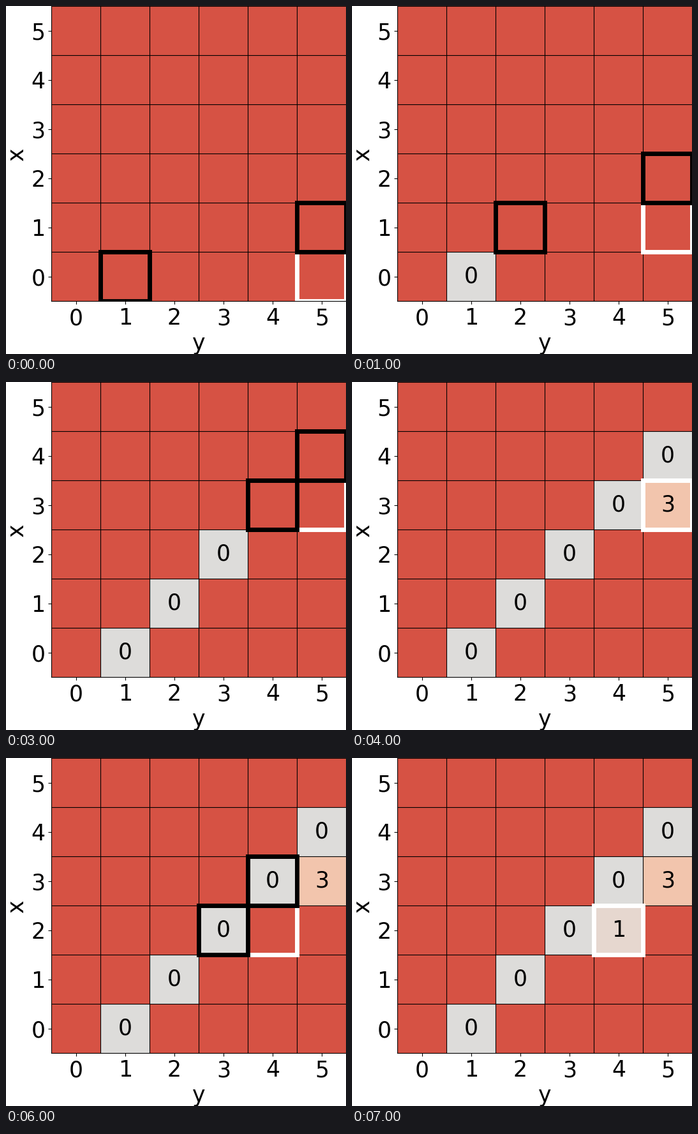
Write a matplotlib script that moves like this. It is 533 by 545 pixels and loops after 8 s.

```python
import matplotlib.pyplot as plt
from matplotlib.animation import FuncAnimation
from matplotlib.patches import Rectangle

W, H, DPI = 533, 545, 100
N, CELL = 6, 77
LEFT, BOTTOM = 71.4, 82.6
SIZE = 25
EMPTY = "#d65244"
SHADES = {0: "#dddcda", 1: "#e6d7cf", 3: "#f2c5ad"}

# (column, row): (value, step at which it is filled in)
FILLED = {
    (1, 0): (0, 1), (2, 1): (0, 2), (3, 2): (0, 3), (4, 3): (0, 4),
    (5, 4): (0, 4), (5, 3): (3, 4), (4, 2): (1, 7),
}

# Each step: the cell being solved and the two cells it depends on
STEPS = [((5, r), [(r + 1, r), (5, r + 1)]) for r in range(4)] + [
    ((5, 3), []),
    ((5, 2), [(4, 2), (5, 4)]),
    ((4, 2), [(3, 2), (4, 3)]),
    ((4, 2), []),
]

plt.rcParams["font.family"] = "DejaVu Sans"
fig = plt.figure(figsize=(W / DPI, H / DPI), dpi=DPI, facecolor="white")
ax = fig.add_axes([LEFT / W, BOTTOM / H, N * CELL / W, N * CELL / H])
ax.set(xlim=(-0.5, N - 0.5), ylim=(-0.5, N - 0.5), facecolor=EMPTY,
       xticks=range(N), yticks=range(N))
ax.tick_params(labelsize=SIZE)
ax.set_xlabel("y", fontsize=SIZE)
ax.set_ylabel("x", fontsize=SIZE)


def square(color=None, edge=None, z=1.0):
    patch = Rectangle((0, 0), 1, 1, facecolor=color or "none",
                      edgecolor=edge or "none", linewidth=5 if edge else 0,
                      zorder=z)
    return ax.add_patch(patch)


def place(patch, cell):
    patch.set_xy((cell[0] - 0.5, cell[1] - 0.5))


fills = []
for cell, (value, start) in FILLED.items():
    patch = square(SHADES[value])
    place(patch, cell)
    label = ax.text(*cell, str(value), fontsize=SIZE, ha="center",
                    va="center", zorder=4)
    fills.append((start, patch, label))

for k in range(1, N):
    ax.axvline(k - 0.5, color="black", lw=0.8, zorder=1.5)
    ax.axhline(k - 0.5, color="black", lw=0.8, zorder=1.5)

target = square(edge="white", z=2)
parts = [square(edge="black", z=2.2) for _ in range(2)]


def draw(step):
    for start, patch, label in fills:
        patch.set_visible(step >= start)
        label.set_visible(step >= start)
    solving, needed = STEPS[step]
    place(target, solving)
    for i, part in enumerate(parts):
        part.set_visible(i < len(needed))
        if i < len(needed):
            place(part, needed[i])
    return []


anim = FuncAnimation(fig, draw, frames=len(STEPS), interval=1000,
                     repeat=True, repeat_delay=0, blit=False)
plt.show()
```
